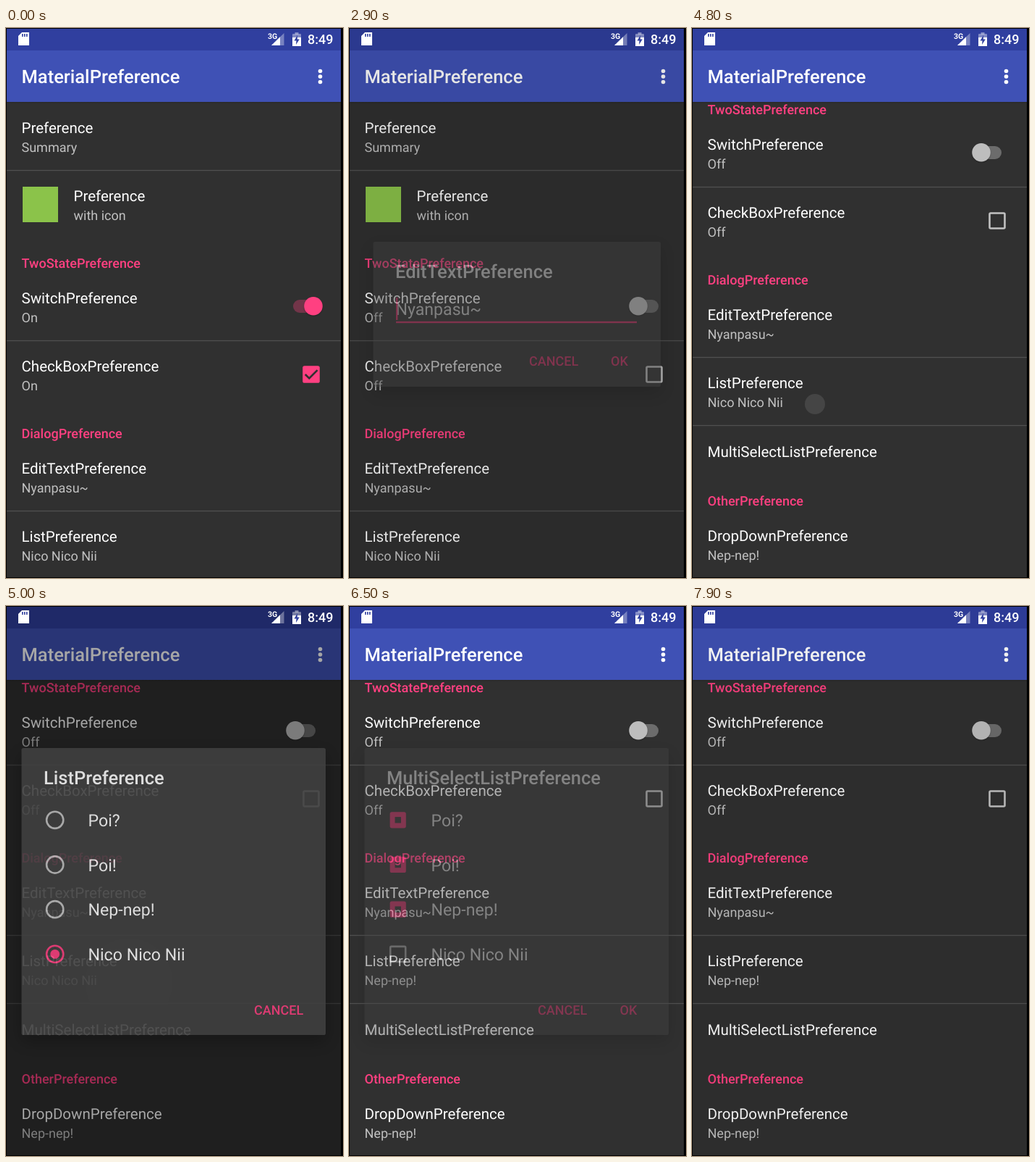
These frames come from a looping animation (466x759 px, 8000 ms). An HTML page with a canvas:

```html
<!DOCTYPE html>
<html lang="en">
<head>
<meta charset="utf-8">
<title>MaterialPreference</title>
<style>
html, body { margin: 0; width: 100%; height: 100%; overflow: hidden; background: #000; }
canvas { display: block; }
</style>
</head>
<body>
<canvas id="stage" width="466" height="759"></canvas>
<script>
const W = 466, H = 759, LOOP = 8000, TICK = 100;
const PINK = '#ff4081', GREY = '#c1c1c1', BG = '#303030', PANEL = '#424242';
const LEFT = 21.5, BODY = 20.5, SMALL = 18, HEAD = 25.5, OPTION = 23.14;
const screen = document.getElementById('stage').getContext('2d');
const layer = document.createElement('canvas');
layer.width = W;
layer.height = H;
const sheet = layer.getContext('2d');
screen.textRendering = sheet.textRendering = 'geometricPrecision';
let c = screen;

// Value per tick from a starting tick, with fixed values on both sides.
function seq(n, start, values, before, after) {
  if (n < start) return before;
  return n - start < values.length ? values[n - start] : after;
}

function text(s, x, y, size, color, weight = 400) {
  c.font = `${weight} ${size}px Roboto, sans-serif`;
  c.fillStyle = color;
  c.fillText(s, x, y);
}

function rect(x, y, w, h, color) {
  c.fillStyle = color;
  c.fillRect(x, y, w, h);
}

function round(x, y, w, h, r, color) {
  c.beginPath();
  c.roundRect(x, y, w, h, r);
  c.fillStyle = color;
  c.fill();
}

function disc(x, y, r, color) {
  c.beginPath();
  c.arc(x, y, r, 0, Math.PI * 2);
  c.fillStyle = color;
  c.fill();
}

function poly(points, color) {
  c.beginPath();
  points.forEach(([x, y]) => c.lineTo(x, y));
  c.closePath();
  c.fillStyle = color;
  c.fill();
}

// Runs a drawing with a soft shadow below its shapes.
function raised(alpha, blur, drop, paint) {
  c.save();
  c.shadowColor = `rgba(0,0,0,${alpha})`;
  c.shadowBlur = blur;
  c.shadowOffsetY = drop;
  paint();
  c.restore();
}

function ripple(x, y, r, alpha, box) {
  if (!r) return;
  c.save();
  c.beginPath();
  c.rect(...box);
  c.clip();
  disc(x, y, r, `rgba(255,255,255,${alpha})`);
  c.restore();
}

// state: 1 checked, 0 unchecked, between: a shrunken box, its fill closing in
function checkBox(x, y, state, back) {
  if (state === 0) {
    c.strokeStyle = GREY;
    c.lineWidth = 2.6;
    c.beginPath();
    c.roundRect(x - 10.5, y - 10.5, 21, 21, 1.5);
    c.stroke();
    return;
  }
  const half = state < 1 ? 11.1 : 11.8;
  round(x - half, y - half, half * 2, half * 2, 2.6, PINK);
  if (state < 1) {
    const hole = 12 * (1 - state);
    rect(x - hole / 2, y - hole / 2, hole, hole, back);
    return;
  }
  c.strokeStyle = back;
  c.lineWidth = 2.6;
  c.beginPath();
  c.moveTo(x - 8.2, y);
  c.lineTo(x - 2.7, y + 5.5);
  c.lineTo(x + 8.6, y - 5.8);
  c.stroke();
}

function radio(x, y, on) {
  c.strokeStyle = on ? PINK : GREY;
  c.lineWidth = 2.6;
  c.beginPath();
  c.arc(x, y, 11.6, 0, Math.PI * 2);
  c.stroke();
  if (on) disc(x, y, 6.4, PINK);
}

function toggle(on, y) {
  const mix = (a, b) => Math.round(a + (b - a) * on);
  const rgb = `${mix(189, 255)},${mix(189, 64)},${mix(189, 129)}`;
  round(397, y - 9, 31, 18, 9, on > 0 ? `rgba(${rgb},.32)` : '#6c6c6c');
  raised(.3, 2, 1, () => disc(400 + 25 * on, y - .2, 12.8, `rgb(${rgb})`));
}

function item(title, summary, y, x = LEFT) {
  text(title, x, y, BODY, '#fff');
  if (summary) text(summary, x, y + 25.5, SMALL, GREY);
}

function list(n) {
  const scroll = seq(n, 41, [70, 180], 0, 212);
  c.save();
  c.beginPath();
  c.rect(1, 102, 462, 656);
  c.clip();
  rect(1, 102, 462, 656, BG);
  c.translate(0, -scroll);

  ripple(172, 388, seq(n, 8, [14, 27, 42], 0, 0), seq(n, 8, [.1, .08, .03], 0, 0), [1, 338, 462, 93]);
  ripple(172, 493, seq(n, 16, [14, 20, 26, 30, 33], 0, 0), seq(n, 16, [.1, .09, .07, .04, .02], 0, 0), [1, 432, 462, 93]);
  ripple(170, 731, seq(n, 48, [14, 32, 60], 0, 0), seq(n, 48, [.1, .08, .04], 0, 0), [1, 667, 462, 93]);

  for (const y of [196, 431, 666, 760]) rect(1, y - .1, 462, 1.3, '#505050');
  [['TwoStatePreference', 331], ['DialogPreference', 566], ['OtherPreference', 871]]
    .forEach(([s, y]) => text(s, LEFT, y, SMALL, PINK, 500));

  item('Preference', 'Summary', 145);
  rect(23, 219, 49, 49, '#8bc34a');
  item('Preference', 'with icon', 239, 93.5);
  item('SwitchPreference', n < 9 ? 'On' : 'Off', 380);
  item('CheckBoxPreference', n < 17 ? 'On' : 'Off', 474);
  item('EditTextPreference', 'Nyanpasu~', 615);
  item('ListPreference', n < 56 ? 'Nico Nico Nii' : 'Nep-nep!', 709);
  item('MultiSelectListPreference', '', 803.5);
  item('DropDownPreference', 'Nep-nep!', 920);
  toggle(seq(n, 8, [1, .6, .1], 1, 0), 384);
  checkBox(422, 478, seq(n, 16, [1, .6, .25], 1, 0), BG);
  c.restore();

  const shade = c.createLinearGradient(0, 102, 0, 105);
  shade.addColorStop(0, 'rgba(0,0,0,.14)');
  shade.addColorStop(1, 'rgba(0,0,0,0)');
  rect(1, 102, 462, 3, shade);
}

function toolbar() {
  rect(1, 1, 462, 30, '#303f9f');
  rect(1, 31, 462, 71, '#3f51b5');
  text('MaterialPreference', LEFT, 76, HEAD, '#fff', 500);
  for (const y of [59.5, 67, 74.5]) disc(434.5, y, 2.8, '#fff');
}

function statusIcons() {
  poly([[22, 6], [32, 6], [32, 24], [17, 24], [17, 11]], '#fff');
  for (const x of [22, 25, 28]) rect(x, 8, 1.6, 4, '#303f9f');
  poly([[384.5, 7], [384.5, 24], [367, 24]], 'rgba(255,255,255,.35)');
  poly([[379, 12.3], [379, 24], [367, 24]], '#fff');
  text('3G', 362, 15, 10.5, '#fff', 700);
  rect(399.5, 6, 5, 3, 'rgba(255,255,255,.4)');
  round(396, 8, 12, 17, 1, 'rgba(255,255,255,.4)');
  rect(396, 13, 12, 12, '#fff');
  poly([[403, 10], [398.5, 17.5], [401.5, 17.5], [401, 23], [405.8, 15.5], [402.8, 15.5]], '#303f9f');
  text('8:49', 417, 22, SMALL, '#fff', 500);
}

function panel(x, y, w, h, title) {
  raised(.3, 22, 9, () => round(x, y, w, h, 2.6, PANEL));
  text(title, x + 30.5, y + 50, HEAD, '#fff', 500);
}

const button = (s, x, y) => text(s, x, y, SMALL, PINK, 500);

function editDialog(n) {
  panel(33.5, 295, 397.5, 200, 'EditTextPreference');
  text('Nyanpasu~', 64.5, 396, OPTION, '#fff');
  rect(65, 404.8, 333, 2.4, PINK);
  if (n < 32) rect(65, 372, 2.4, 31, PINK);
  button('CANCEL', 249, 465.5);
  button('OK', 362, 465.5);
}

function choices(mark) {
  ['Poi?', 'Poi!', 'Nep-nep!', 'Nico Nico Nii'].forEach((s, i) => {
    const y = 295.3 + i * 61.7;
    mark(y, i);
    text(s, 113.5, y + 8.6, OPTION, '#fff');
  });
}

function listDialog(n) {
  panel(21.5, 196, 420.5, 396, 'ListPreference');
  if (n >= 56) rect(21.5, 387, 420.5, 61.5, 'rgba(255,255,255,.08)');
  choices((y, i) => radio(67.7, y, i === 3));
  button('CANCEL', 343, 563.5);
}

function multiDialog(n) {
  panel(21.5, 196, 420.5, 396, 'MultiSelectListPreference');
  const fill = seq(n, 65, [.3, .6, .85], 1, 1);
  choices((y, i) => checkBox(67.7, y, i < 3 ? fill : 0, PANEL));
  ripple(386, 557, seq(n, 73, [14, 22, 30, 38, 46], 0, 0), .1, [348, 534, 78, 46]);
  button('CANCEL', 261, 563.5);
  button('OK', 374.5, 563.5);
}

// Opacity and dim per tick while a dialog opens and closes.
const dialogs = [
  { draw: editDialog, open: 29, close: 37, fadeIn: [.4], dimIn: [.1], fadeOut: [.15], dimOut: [.32] },
  { draw: listDialog, open: 49, close: 56, fadeIn: [.4, .85], dimIn: [0, .35], fadeOut: [.4, .05], dimOut: [.44, .16] },
  { draw: multiDialog, open: 65, close: 78, fadeIn: [.4, .8, .97], dimIn: [0, .25, .5], fadeOut: [.2, 0], dimOut: [.35, .06] }
];

function phase(n, d, fadeIn, fadeOut, full) {
  return n < d.close ? seq(n, d.open, fadeIn, 0, full) : seq(n, d.close, fadeOut, 0, 0);
}

function draw(n) {
  c = screen;
  rect(0, 0, W, H, '#000');
  list(n);
  toolbar();
  for (const d of dialogs) {
    const dim = phase(n, d, d.dimIn, d.dimOut, .6);
    const alpha = phase(n, d, d.fadeIn, d.fadeOut, 1);
    if (dim) rect(1, 1, 462, 757, `rgba(0,0,0,${dim})`);
    if (!alpha) continue;
    c = sheet;
    c.clearRect(0, 0, W, H);
    d.draw(n);
    c = screen;
    c.globalAlpha = alpha;
    c.drawImage(layer, 0, 0);
    c.globalAlpha = 1;
  }
  statusIcons();
}

const start = performance.now();
function loop() {
  draw(Math.floor(((performance.now() - start) % LOOP) / TICK));
  requestAnimationFrame(loop);
}
loop();
</script>
</body>
</html>
```
